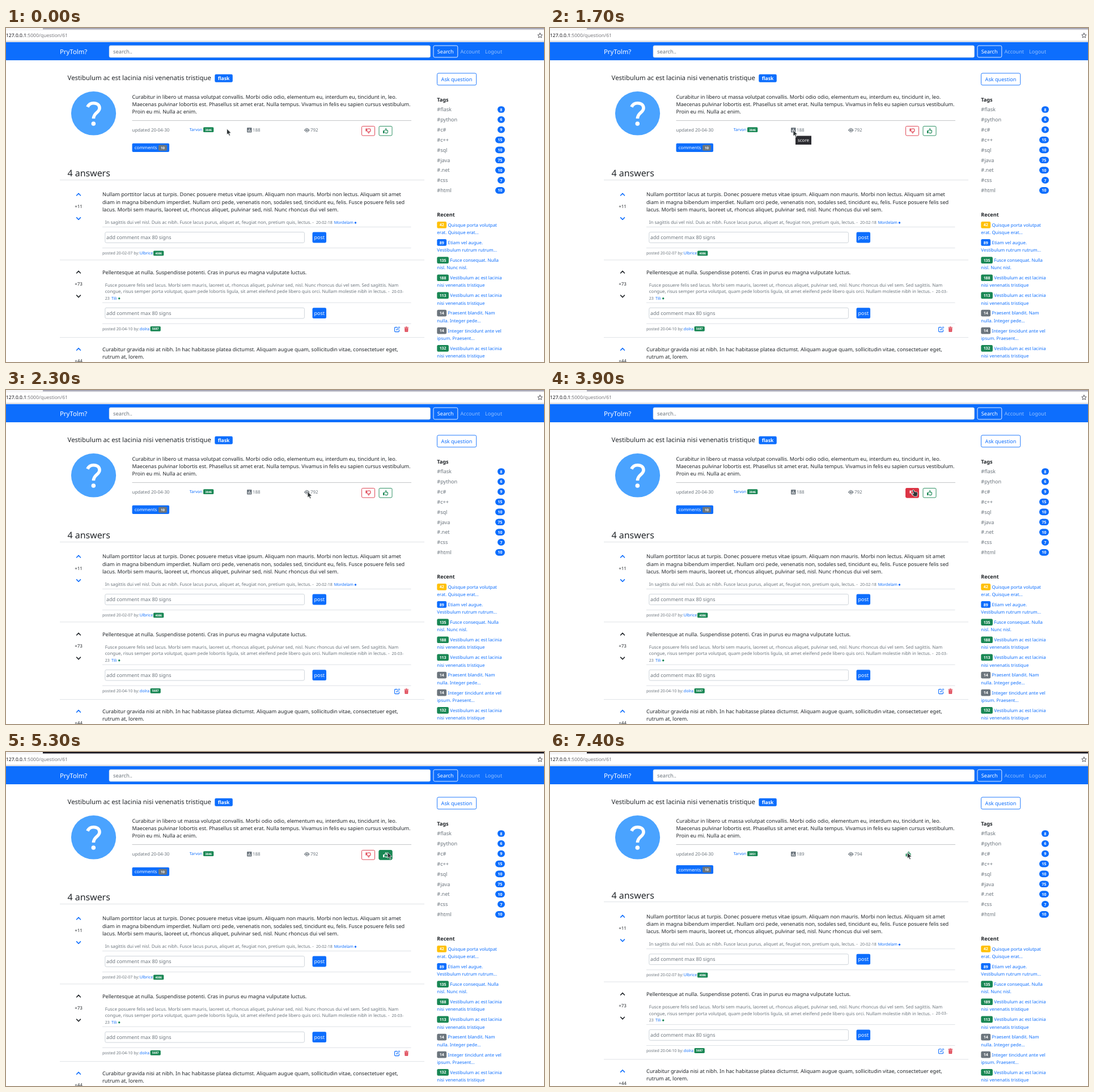
Write an HTML page that moves like this. It is 949 px wide and 590 px high and loops after 8000 ms.

```html
<!DOCTYPE html>
<html lang="en">
<head>
<meta charset="utf-8">
<title>Question page</title>
<style>
html, body { margin: 0; width: 100%; height: 100%; overflow: hidden; background: #fff; }
svg { display: block; font-family: "Noto Sans", sans-serif; text-rendering: geometricPrecision; }
</style>
</head>
<body>
<svg id="stage" width="949" height="590" viewBox="0 0 949 590"></svg>
<script>
const BLUE = '#0d6efd', GREEN = '#198754', RED = '#dc3545', GREY = '#6c757d',
  INK = '#212529', RULE = '#dee2e6', YELLOW = '#ffc107';
const BODY = 9.1, SMALL = 7.94, TINY = 7.06;

// Text is placed by its vertical centre
const text = (x, y, str, size = BODY, fill = INK, attrs = '') =>
  `<text x="${x}" y="${y + size * .37}" font-size="${size}" fill="${fill}" ${attrs}>${str}</text>`;
const middle = 'text-anchor="middle"';
const box = (x, y, w, h, r, fill, stroke = 'none', attrs = '') =>
  `<rect x="${x}" y="${y}" width="${w}" height="${h}" rx="${r}" fill="${fill}" stroke="${stroke}" ${attrs}/>`;
const rule = (x1, x2, y, color = RULE) =>
  `<path d="M${x1} ${y}H${x2}" stroke="${color}"/>`;
const line = (d, color, width = 1) =>
  `<path d="${d}" fill="none" stroke="${color}" stroke-width="${width}" stroke-linecap="round" stroke-linejoin="round"/>`;
const badge = (x, y, w, h, r, fill, str, size, id = '') =>
  box(x, y - h / 2, w, h, r, fill) +
  text(x + w / 2, y, str, size, '#fff', `${middle} font-weight="700" ${id && `id="${id}"`}`);
const paragraph = (x, y, gap, lines, size, fill) =>
  lines.map((s, i) => text(x, y + i * gap, s, size, fill)).join('');
const chevron = (y, dir, color) =>
  line(`M124.6 ${y + 1.8 * dir}l3.4 ${-3.6 * dir}l3.4 ${3.6 * dir}`, color, 1.6);
const thumb = (x, y, color, flip = 1, id = '') =>
  `<g transform="translate(${x} ${y}) scale(1 ${flip})" color="${color}" ${id && `id="${id}"`}>
   <rect x="-4.5" y="-.7" width="2.2" height="5" rx=".5" fill="currentColor"/>` +
  line('M-1.7 .2C-.3 -1 -.6 -4 .5 -4C2 -4 1.8 -2.2 1.2 -.9H3.5Q4.4 -.6 3.9 .6Q4 3.8 2.6 3.8H.3L-1.7 3', 'currentColor', 1.1) + '</g>';

const browserBar = () =>
  box(0, 0, 949, 25, 0, '#f5f5f7') + box(65, 0, 884, 2.5, 0, '#a9a9b8', 'none', 'id="tabs"') +
  box(-6, 4.5, 961, 17.5, 2, '#fff') + rule(0, 949, 23.5, '#c9c9ce') +
  text(0, 13, `127.0.0.1<tspan fill="#77777c">:5000/question/61</tspan>`, 8.53, '#15141a') +
  line('M942 9l1.2 2.8l3 .3l-2.3 2l.7 3l-2.6-1.6l-2.6 1.6l.7-3l-2.3-2l3-.3z', '#4a4a50', .9);

const navBar = () =>
  box(0, 25, 949, 32, 0, BLUE) + text(95, 41.5, 'PryTolm?', 11.37, '#fff') +
  box(182, 31, 566.5, 21, 2.5, '#fff', '#ced4da', 'stroke-width=".6"') +
  text(189, 41.5, 'search..', 9.3, GREY) +
  box(754, 31.2, 42.8, 20.6, 2.5, 'none', '#fff', 'stroke-width=".9"') +
  text(775.2, 41.5, 'Search', BODY, '#fff', middle) +
  text(801.5, 41.5, 'Account', BODY, '#92bffe') + text(845, 41.5, 'Logout', BODY, '#92bffe');

const voteButton = (x, color, flip, name) =>
  box(x, 173.5, 23, 16.6, 2, '#fff', color, 'stroke-width=".9"') +
  box(x, 173.5, 23, 16.6, 2, color, color, `id="${name}Fill" stroke-width=".9" opacity="0"`) +
  thumb(x + 11.5, 181.8, color, flip, name + 'Icon');

const question = () =>
  text(108.6, 88, 'Vestibulum ac est lacinia nisi venenatis tristique', 11.34) +
  badge(368.3, 88.8, 31.5, 14, 2.3, BLUE, 'flask', 8.6) +
  '<ellipse cx="154.5" cy="150.8" rx="39.6" ry="38.8" fill="#4aa3ff"/>' +
  '<path d="M143.8 139.5C146 134.5 150 132.7 154.5 132.7C161 132.7 165 136.5 165 141.5C165 149.5 154.4 149.5 154.4 160" fill="none" stroke="#fff" stroke-width="5.6"/>' +
  '<circle cx="154.3" cy="169" r="3.8" fill="#fff"/>' +
  paragraph(222.5, 121.3, 13.3, [
    'Curabitur in libero ut massa volutpat convallis. Morbi odio odio, elementum eu, interdum eu, tincidunt in, leo.',
    'Maecenas pulvinar lobortis est. Phasellus sit amet erat. Nulla tempus. Vivamus in felis eu sapien cursus vestibulum.',
    'Proin eu mi. Nulla ac enim.']) +
  rule(222.5, 715, 163.5, '#c4c6c8') +
  text(222.5, 180.5, 'updated 20-04-30', SMALL, GREY) +
  text(323.7, 179.3, 'Tarvon', TINY, BLUE) +
  badge(348, 179.7, 18.3, 8.8, 1.6, GREEN, '3846', 5.2, 'karma') +
  box(425, 176, 8.6, 8.6, 1, GREY) +
  line('M427.2 180.5v2.2M429.3 178v4.7M431.4 181.3v1.4', '#fff', 1) +
  text(435, 180.5, '188', SMALL, GREY, 'id="score"') +
  `<path d="M526 180.5Q530.7 173.2 535.5 180.5Q530.7 187.8 526 180.5" fill="${GREY}"/>` +
  '<circle cx="530.7" cy="180.5" r="2.5" fill="#fff"/>' +
  `<circle cx="530.7" cy="180.5" r="1.6" fill="${GREY}"/>` +
  text(537, 180.5, '792', SMALL, GREY, 'id="views"') +
  `<g id="votes">${voteButton(627.5, RED, -1, 'down')}${voteButton(658, GREEN, 1, 'up')}</g>` +
  `<g id="voted">${thumb(632, 180.3, GREEN)}</g>`;

const commentForm = y =>
  rule(170, 714.5, y - 18.5) +
  box(174.8, y - 9.4, 351.6, 18.8, 2.3, '#fff', '#ced4da') +
  text(177, y, 'add comment max 80 signs', 8.85, GREY) +
  box(540.5, y - 9.4, 24.5, 18.8, 2.3, BLUE) + text(552.8, y, 'post', 8.95, '#fff', middle) +
  rule(170, 714.5, y + 18.6);
const posted = (y, date, name, badgeX, karma) =>
  text(170, y, `posted ${date} by:`, TINY, GREY) + text(235.8, y, name, TINY, BLUE) +
  badge(badgeX, y + .3, 18.3, 8.8, 1.6, GREEN, karma, 5.2);
const dot = (x, y, color) => `<circle cx="${x}" cy="${y}" r="1.7" fill="${color}"/>`;
const votes = (y, count, color) =>
  chevron(y, 1, color) + text(128, y + 21, count, SMALL, INK, middle) + chevron(y + 42.7, -1, color);

const answers = () =>
  box(222.5, 203.8, 65.5, 15.2, 2, BLUE) + text(226.8, 211.4, 'comments', SMALL, '#fff') +
  badge(269, 211.6, 14.8, 10.4, 2, GREY, '10', 6) +
  text(108.6, 256.6, '4 answers', 15.9) + rule(95, 738, 268.5) +

  votes(294, '+11', BLUE) +
  paragraph(170, 294, 13.3, [
    'Nullam porttitor lacus at turpis. Donec posuere metus vitae ipsum. Aliquam non mauris. Morbi non lectus. Aliquam sit amet',
    'diam in magna bibendum imperdiet. Nullam orci pede, venenatis non, sodales sed, tincidunt eu, felis. Fusce posuere felis sed',
    'lacus. Morbi sem mauris, laoreet ut, rhoncus aliquet, pulvinar sed, nisl. Nunc rhoncus dui vel sem.']) +
  text(174.8, 343.3, 'In sagittis dui vel nisl. Duis ac nibh. Fusce lacus purus, aliquet at, feugiat non, pretium quis, lectus. -', 7.93, GREY) +
  text(547, 343.6, '20-02-18', TINY, GREY) + text(578.7, 343.6, 'Mordelam', TINY, BLUE) + dot(616.4, 344, BLUE) +
  commentForm(370) + posted(397.6, '20-02-07', 'Ulbrice', 260, '4086') + rule(95, 738, 409.8) +

  votes(431.2, '+73', INK) +
  text(170, 431.2, 'Pellentesque at nulla. Suspendisse potenti. Cras in purus eu magna vulputate luctus.') +
  paragraph(174.8, 453.8, 11.6, [
    'Fusce posuere felis sed lacus. Morbi sem mauris, laoreet ut, rhoncus aliquet, pulvinar sed, nisl. Nunc rhoncus dui vel sem. Sed sagittis. Nam',
    'congue, risus semper porta volutpat, quam pede lobortis ligula, sit amet eleifend pede libero quis orci. Nullam molestie nibh in lectus. -'],
    7.93, GREY) +
  text(680.5, 465.6, '20-03-', TINY, GREY) + text(174.8, 477.4, '23', TINY, GREY) +
  text(186, 477.4, 'Tili', TINY, BLUE) + dot(199.7, 477.8, GREEN) +
  commentForm(503.7) + posted(531, '20-04-10', 'dolra', 254.5, '5687') +
  line('M690 528.6H686.6Q685.6 528.6 685.6 529.6V535.6Q685.6 536.6 686.6 536.6H692.4Q693.4 536.6 693.4 535.6V533', BLUE, 1.1) +
  line('M689 533.4l.4-1.7l4-4l1.3 1.3l-4 4z', BLUE, 1) +
  `<path d="M702.5 528.4h2.4l.5-.8h1.8l.5.8h2.4v1.2h-7.6zM703.1 530.2h6.4l-.4 6.6h-5.6z" fill="${RED}"/>` +
  line('M704.9 531.4v4M706.3 531.4v4M707.7 531.4v4', '#f2b6bc', .5) +
  rule(95, 738, 546.7) +

  votes(567.4, '+44', BLUE) +
  paragraph(170, 567.4, 13.3, [
    'Curabitur gravida nisi at nibh. In hac habitasse platea dictumst. Aliquam augue quam, sollicitudin vitae, consectetuer eget,',
    'rutrum at, lorem.']);

const tags = { flask: 8, python: 6, 'c#': 9, 'c++': 15, sql: 10, java: 75, '.net': 10, css: 7, html: 10 };
const vestibulum = ['Vestibulum ac est lacinia', 'nisi venenatis tristique'];
const recent = [
  [42, YELLOW, 'Quisque porta volutpat', 'erat. Quisque erat...'],
  [89, BLUE, 'Etiam vel augue.', 'Vestibulum rutrum rutrum...'],
  [135, GREEN, 'Fusce consequat. Nulla', 'nisl. Nunc nisl.'],
  [188, GREEN, ...vestibulum],
  [113, GREEN, ...vestibulum],
  [14, GREY, 'Praesent blandit. Nam', 'nulla. Integer pede...'],
  [14, GREY, 'Integer tincidunt ante vel', 'ipsum. Praesent...'],
  [132, GREEN, ...vestibulum]];

const sidebar = () =>
  box(760.5, 79.9, 69.2, 21, 2.5, '#fff', BLUE, 'stroke-width=".9"') +
  text(795, 90.4, 'Ask question', BODY, BLUE, middle) +
  text(760.3, 126.3, 'Tags', BODY, INK, 'font-weight="700"') +
  Object.entries(tags).map(([name, count], i) => {
    const y = 144 + i * 17.85, w = count > 9 ? 17 : 13;
    return text(760.3, y, '#' + name, BODY, GREY) + badge(880 - w, y, w, 11.7, 5.85, BLUE, count, 6.9);
  }).join('') +
  text(760.3, 329.5, 'Recent', BODY, INK, 'font-weight="700"') +
  recent.map(([score, color, first, second], i) => {
    const y = 347.8 + i * 31.15, w = score > 99 ? 20.6 : 16.8;
    return badge(760.3, y, w, 11.7, 2.2, color, score, 6.9, score === 188 ? 'recentScore' : '') +
      text(762.7 + w, y, first, SMALL, BLUE) + text(760.3, y + 13.3, second, SMALL, BLUE);
  }).join('');

const overlay = () =>
  `<g id="tip">${box(433, 190.5, 28, 15.5, 0, '#2b2b30')}${text(447, 198.2, 'score', SMALL, '#fff', middle)}</g>` +
  '<g fill="#2e3436" stroke="#fff" stroke-width=".7" stroke-linejoin="round">' +
  '<path id="arrow" d="M0 0V10.5L2.4 8.4L4.3 12.4L6 11.6L4.3 7.8L7.6 7.5Z"/>' +
  '<path id="hand" d="M-3.4 -5.6Q-2.3 -6.4 -1.6 -5.3L-.4 -2.3L3 -2Q5 -1.7 4.9 .3L4.6 3.2L3.7 6H-1.2L-4.8 2Q-5.4 .8 -4.1 .6L-2.1 1.4L-3.9 -4.4Z"/></g>';

const stage = document.getElementById('stage');
stage.innerHTML = browserBar() + navBar() + question() + `<g id="answers">${answers()}</g>` + sidebar() + overlay();
const $ = id => document.getElementById(id);

// Pointer path: time, x, y
const path = [
  [0, 389.5, 178], [100, 389.5, 178], [400, 409, 175.5], [700, 425.5, 180], [1600, 425.5, 180],
  [1700, 429, 180.5], [2000, 480, 169], [2300, 532, 179.5], [3800, 532, 179.5],
  [3900, 643.5, 182], [4300, 643.5, 182], [4500, 675, 182], [5200, 675, 182],
  [5300, 673, 177], [6400, 673, 177], [6500, 675, 182], [6800, 675, 182],
  [6900, 668, 180], [7100, 668, 180], [7200, 643.5, 180], [7300, 643.5, 180], [7400, 630.3, 177.5], [8000, 630.3, 177.5]];

function pointerAt(t) {
  const i = path.findIndex(p => p[0] > t);
  const [t0, x0, y0] = path[i - 1], [t1, x1, y1] = path[i];
  const k = (t - t0) / (t1 - t0);
  return [x0 + (x1 - x0) * k, y0 + (y1 - y0) * k];
}
const show = (id, opacity) => $(id).setAttribute('opacity', +opacity);
const during = (t, from, to) => t >= from && t < to;

function vote(name, amount, color) {
  show(name + 'Fill', amount);
  $(name + 'Icon').setAttribute('color', amount > .4 ? '#fff' : color);
}

function draw(now) {
  const t = Math.floor(now % 8000 / 100) * 100;
  const upvoted = t >= 6500;
  const hand = during(t, 3900, 5300) || during(t, 6500, 6900);
  const [x, y] = pointerAt(t);
  for (const id of ['arrow', 'hand']) {
    $(id).setAttribute('transform', `translate(${x} ${y})`);
    show(id, (id === 'hand') === hand);
  }
  show('tip', t < 1800 ? Math.min(1, Math.max(0, (t - 1100) / 300)) : 0);
  vote('down', during(t, 3900, 4400) ? 1 : t === 4400 ? .4 : 0, RED);
  vote('up', during(t, 4500, 6500) ? 1 : t === 4400 ? .4 : 0, GREEN);
  show('votes', !upvoted);
  show('voted', upvoted);
  $('tabs').setAttribute('fill', t < 5300 ? '#a9a9b8' : '#15131c');
  $('answers').setAttribute('transform', `translate(0 ${upvoted ? -3.8 : 0})`);
  $('karma').textContent = upvoted ? 3851 : 3846;
  $('score').textContent = $('recentScore').textContent = upvoted ? 189 : 188;
  $('views').textContent = upvoted ? 794 : 792;
}

const start = performance.now();
function tick() {
  draw(performance.now() - start);
  requestAnimationFrame(tick);
}
tick();
</script>
</body>
</html>
```
